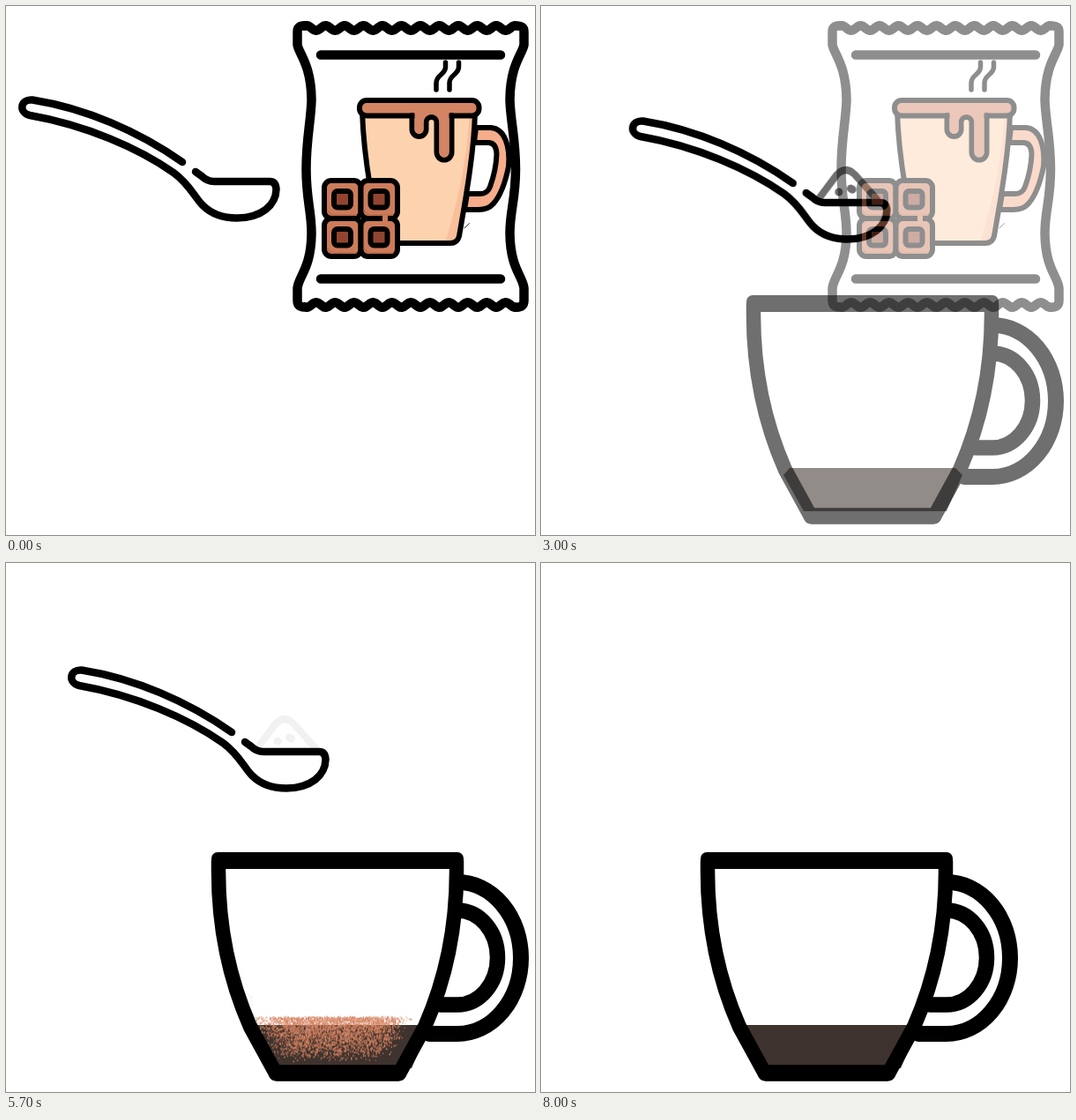
Recreate the animation shown at these times as an HTML page with a canvas. Size 600 by 600 pixels, loop 9000 ms.

```html
<!DOCTYPE html>
<html lang="en">
<head>
<meta charset="utf-8">
<title>Hot chocolate</title>
<style>
html, body { margin: 0; width: 100%; height: 100%; overflow: hidden; background: #fff; }
canvas { display: block; width: 600px; height: 600px; }
</style>
</head>
<body>
<canvas id="stage" width="600" height="600"></canvas>
<script>
const SIZE = 600, LOOP = 9000, STEP = 100;
const ctx = document.getElementById('stage').getContext('2d');

// Each layer is drawn once, so that it can fade as a whole.
function layer(draw) {
  const c = document.createElement('canvas');
  c.width = c.height = SIZE;
  const g = c.getContext('2d');
  g.lineCap = g.lineJoin = 'round';
  draw(g);
  return c;
}

function shape(g, d, width, fill, line = '#000') {
  const p = new Path2D(d);
  if (fill) { g.fillStyle = fill; g.fill(p, 'evenodd'); }
  if (width) { g.lineWidth = width; g.strokeStyle = line; g.stroke(p); }
}

function box(g, x, y, w, h, r, width, fill) {
  g.beginPath();
  g.roundRect(x, y, w, h, r);
  if (fill) { g.fillStyle = fill; g.fill(); }
  if (width) { g.lineWidth = width; g.strokeStyle = '#000'; g.stroke(); }
}

function rng(seed) {
  return () => {
    seed = (seed * 1664525 + 1013904223) >>> 0;
    return seed / 4294967296;
  };
}

const spoon = layer(g => shape(g,
  'M200 177 C150 142 90 116 30 106.5 C16 105 14 121 27 124 ' +
  'C90 135 150 161 190 189 C208 202 214 217 223 226 ' +
  'C233 236 247 240.5 262 240.5 C290 240 306 226 306.5 208 ' +
  'Q306 199 299 199 H236 Q228 199 222 193 L215 188', 8.5));

const pile = layer(g => {
  shape(g, 'M229 195 L250 167 Q260 157 270 167 L295 195', 8);
  shape(g, 'M252 187 h.1 M265.5 183 l2 1.2', 9);
});

function wrapper(g) {
  const wave = x => 25 - 2.8 * Math.cos((x - 341) / 21.5 * 2 * Math.PI);
  const xs = Array.from({ length: 121 }, (_, i) => 339 + i * 2);
  const top = xs.map(x => `L${x} ${wave(x).toFixed(2)}`).join(' ');
  const bottom = xs.reverse().map(x => `L${x} ${(364 - wave(x)).toFixed(2)}`).join(' ');
  shape(g, 'M330.5 44 V29 Q330.5 22 339 22.3 ' + top +
    ' Q587.5 22 587.5 29 V44 C586 54 572 66 571.5 106 C572 130 578 150 578 185 ' +
    'C578 220 571.5 232 571.5 258 C572 298 586 306 587.5 320 V334 Q587.5 342 579 341.7 ' + bottom +
    ' Q330.5 342 330.5 334 V320 C332 306 346 298 346.5 258 C346.5 232 340.5 220 340.5 185 ' +
    'C340.5 150 346 130 346.5 106 C346 66 332 54 330.5 44 Z', 10.5);
  shape(g, 'M357 55.5 H561 M357 309.5 H561', 10.5);
}

function smallMug(g) {
  const side = 'C522 215 531 165 532 120 Z';
  const body = 'M404 120 C405 150 408 175 413 205 L424 269 H504 Q512 269 514 261 ' + side;
  shape(g, 'M533 138 H550 C566 139 572 160 570 182 C566 202 560 216 553 224 ' +
    'Q547 231 536 231 H520 L523 213 H538 Q546 213 549 205 C553 194 556 182 556.5 168 ' +
    'Q556 155 547 155 H531 Z', 6, '#f5ad8b');
  shape(g, body, 0, '#fdd2ae');
  shape(g, 'M532 120 H526 C523 175 513 220 498 269 H504 Q512 269 514 261 ' + side, 0, '#f9bf9a');
  shape(g, body, 6);
  box(g, 401, 107, 135.5, 17.5, 8, 6, '#d28463');
  shape(g, 'M460.5 124 V140 a8 8 0 0 0 16 0 V132 a6 6 0 0 1 12 0 V166 a8.5 8.5 0 0 0 17 0 V124', 6);
  shape(g, 'M463.5 118 H502.5 V166 a5.5 5.5 0 0 1 -11 0 V132 a9 9 0 0 0 -18 0 V140 ' +
    'a5 5 0 0 1 -10 0 Z', 0, '#d28463');
  shape(g, 'M473.5 132 a9 9 0 0 1 18 0', 0);
  for (const x of [0, 15])
    shape(g, `M${498.5 + x} 64 V69 C${498.5 + x} 78 ${488 + x} 78 ${488 + x} 87 V95`, 5.5);
  shape(g, 'M520 252 L525.5 246.5', 0.8);
}

function chocolate(g) {
  for (const x of [361, 402.5])
    for (const y of [198, 241]) {
      box(g, x, y, 41.5, 43, 8, 6, '#cd7c5b');
      shape(g, `M${x + 4} ${y + 34} Q${x + 6} ${y + 39} ${x + 12} ${y + 39} H${x + 36}`, 2, null, '#bd6c4c');
      box(g, x + 11, y + 12, 19, 18.5, 4, 6, '#914530');
    }
  g.fillStyle = '#cd7c5b';
  g.fillRect(427, 237, 6, 8);
}

const packet = layer(g => { wrapper(g); smallMug(g); chocolate(g); });

const cup = layer(g => {
  box(g, 233, 328, 286, 19, 7, 0, '#000');
  shape(g, 'M241 338 V350 C241 424 258 483 277 526 L306 579 H446 L475 526 ' +
    'C494 483 511 424 511 350 V338', 16.5);
  shape(g, 'M307 578.5 H445', 18.5);
  shape(g, 'M512 362 A72 86 0 0 1 512 534 H480', 18);
  shape(g, 'M512 394 A45.5 53.5 0 0 1 512 501 H493', 17.5);
});

const liquid = layer(g => shape(g,
  'M282 524 H470 L478 532 L460 573 H298 L275 532 Z', 0, '#3e332e'));

// Grains lie densely at the top and thin out downwards.
const powder = layer(g => {
  const rand = rng(7);
  const tones = ['#d98a69', '#cf7a58', '#e09a7c', '#c9714f'];
  for (let i = 0; i < 4200; i++) {
    const depth = 1 - Math.sqrt(1 - rand());
    const side = (rand() + rand() * 0.25) / 1.25 * 2 - 1;
    const x = 369 + side * (92 - 25 * depth);
    const y = 351 + depth * 50 + rand() * 2;
    const s = 0.8 + rand() * 0.8;
    g.fillStyle = tones[i % 4];
    g.fillRect(x, y, s, s);
  }
  g.fillStyle = '#efc8b8';
  for (let i = 0; i < 14; i++)
    g.fillRect(268 + rand() * 14, 325 + rand() * 35, 1, 1);
});

// Progress from 0 to 1 between two steps.
const ramp = (s, a, b) => Math.min(1, Math.max(0, (s - a) / (b - a)));

function put(img, x, y, alpha) {
  if (alpha <= 0) return;
  ctx.globalAlpha = alpha;
  ctx.drawImage(img, x, y);
}

function render(time) {
  const s = Math.floor((time % LOOP) / STEP);
  const scoop = ramp(s, 0, 21), swap = ramp(s, 21, 37), pour = ramp(s, 38, 58);
  const leave = ramp(s, 58, 64), settle = ramp(s, 64, 80);
  const sx = 124 * scoop - 68 * swap, sy = 35.5 * scoop - 20.5 * swap;
  const cx = -131 * leave + 79 * settle;

  ctx.globalAlpha = 1;
  ctx.fillStyle = '#fff';
  ctx.fillRect(0, 0, SIZE, SIZE);
  put(liquid, cx, 0, swap);
  put(powder, cx, 171 * pour, pour * (1 - settle));
  put(cup, cx, 0, swap);
  put(pile, sx, sy, swap * (1 - pour));
  put(spoon, sx, sy, 1 - leave);
  put(packet, 0, 0, 1 - swap);
}

const start = performance.now();
function tick() {
  render(performance.now() - start);
  requestAnimationFrame(tick);
}
tick();
</script>
</body>
</html>
```
